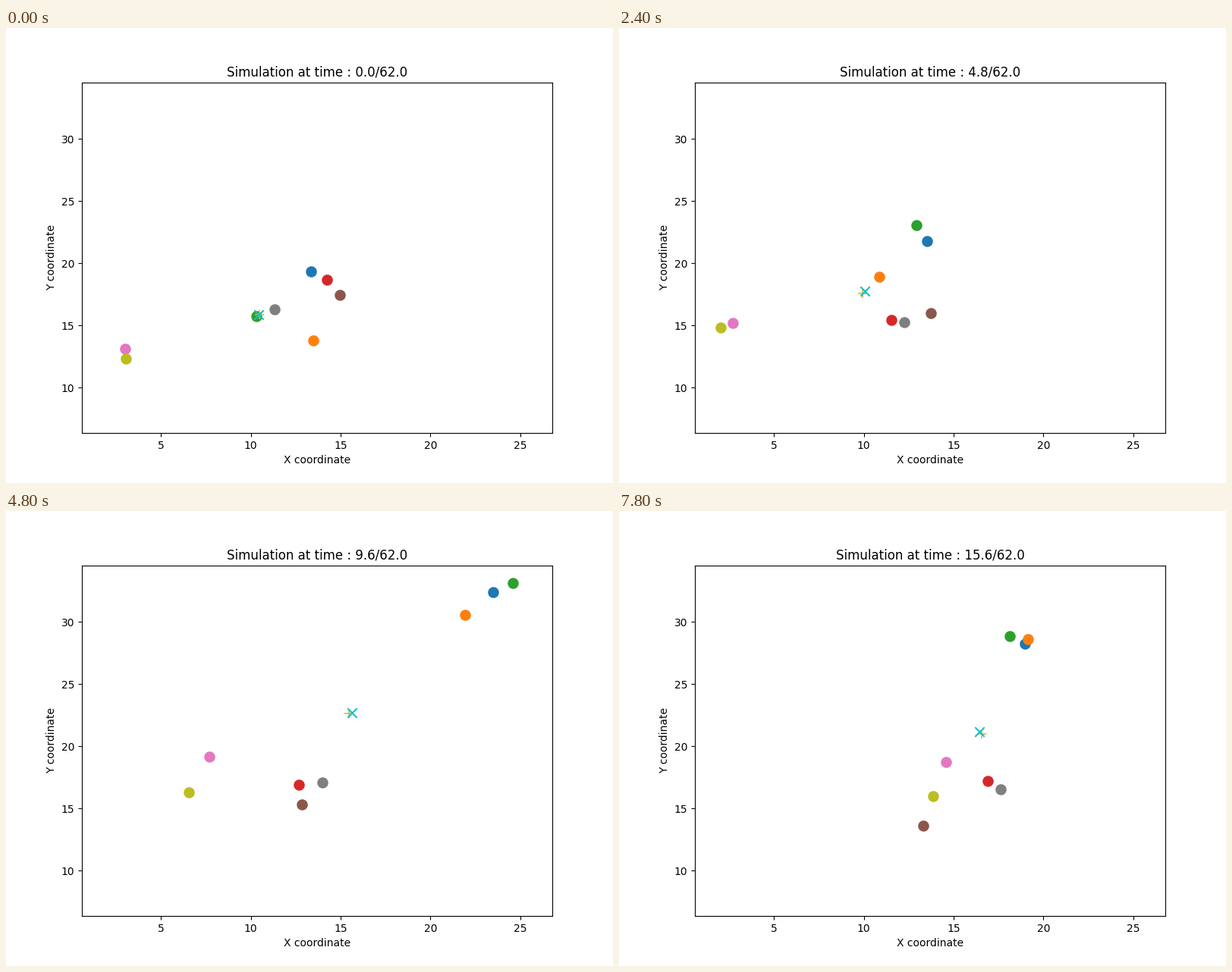
Animation, 800 px wide and 600 px high, one loop 8 s. Source, as a matplotlib script:

```python
import numpy as np
import matplotlib.pyplot as plt
from matplotlib.animation import FuncAnimation

FRAMES, INTERVAL, STEP, END = 40, 200, 0.4, 62.0
XLIM, YLIM = (0.6, 26.783), (6.37, 34.54)

# Each agent glides along a smooth curve through a few stage points (x + yj).
# Runners need points around their sprint; walkers use even spacing.
RUN_STEPS = [0, 8, 16, 20, 24, 32, 39]
WALK_STEPS = [0, 10, 20, 30, 39]
RUNNERS = {
    "C0": [402.5+321j, 392.5+340.5j, 469.5+198j, 583+131.5j,
           641.5+107j, 666+108j, 535.3+175j],
    "C1": [405+411.7j, 385.7+405.5j, 353+228j, 470.7+153.5j,
           604.7+136.7j, 659+112.3j, 539+169j],
    "C2": [329.7+380.3j, 384.7+338j, 458.2+175j, 607.2+120j,
           667.8+94.7j, 666.7+109j, 515+165.3j],
}
WALKERS = {
    "C3": [423.4+331.6j, 371+383j, 348+371j, 457+352.5j, 486.4+356.2j],
    "C5": [440+352.2j, 420+374j, 384+382.5j, 408+396j, 401.2+415.3j],
    "C6": [157.2+422.7j, 145+398j, 212+343j, 355+310j, 430.7+330.8j],
    "C7": [354.2+370.5j, 376+390j, 387+368j, 470+351.5j, 502.6+366.8j],
    "C8": [158+436.1j, 131+402j, 187+375j, 328+371j, 413.8+376.2j],
}


def spline(t, p):
    """Natural cubic spline through points p at steps t, for every frame."""
    t, p = np.array(t, float), np.array(p)
    n, h = len(t), np.diff(t)
    slope = np.diff(p) / h
    a, b = np.eye(n), np.zeros(n, complex)
    for i in range(1, n - 1):
        a[i, i - 1:i + 2] = h[i - 1], 2 * (h[i - 1] + h[i]), h[i]
        b[i] = 6 * (slope[i] - slope[i - 1])
    m = np.linalg.solve(a, b)
    s = np.arange(FRAMES)
    k = np.clip(np.searchsorted(t, s, side="right") - 1, 0, n - 2)
    u, v, d = s - t[k], t[k + 1] - s, h[k]
    return ((m[k] * v**3 + m[k + 1] * u**3) / (6 * d)
            + (p[k] / d - m[k] * d / 6) * v
            + (p[k + 1] / d - m[k + 1] * d / 6) * u)


def to_data(p):
    x = XLIM[0] + (p.real - 100) / 620 * np.ptp(XLIM)
    y = YLIM[0] + (534 - p.imag) / 462 * np.ptp(YLIM)
    return np.column_stack([x, y])


agents = {c: spline(RUN_STEPS, p) for c, p in RUNNERS.items()}
agents |= {c: spline(WALK_STEPS, p) for c, p in WALKERS.items()}
centre = np.mean(list(agents.values()), axis=0)

# The estimated centre is the true one plus a little measurement noise
rng = np.random.default_rng(4)
noise = rng.normal(0, 1.8, (FRAMES, 2)) @ [1, 1j]

fig, ax = plt.subplots(figsize=(8, 6), dpi=100)
ax.set(xlim=XLIM, ylim=YLIM, xlabel="X coordinate", ylabel="Y coordinate")
ax.set_xticks(range(5, 30, 5))
ax.set_yticks(range(10, 35, 5))
title = ax.set_title("")

movers = []


def add(path, color, marker="o", width=1.5):
    dot = ax.scatter([], [], s=80, color=color, marker=marker, linewidth=width)
    movers.append((dot, to_data(path)))


for color, path in agents.items():
    add(path, color)
add(centre, "#c8bc3c", "+", 1.2)
add(centre + noise, "C9", "x")


def draw(i):
    for dot, path in movers:
        dot.set_offsets(path[i])
    title.set_text(f"Simulation at time : {i * STEP:.1f}/{END}")
    return [dot for dot, _ in movers] + [title]


anim = FuncAnimation(fig, draw, frames=FRAMES, interval=INTERVAL,
                     init_func=lambda: draw(0), repeat=True, repeat_delay=0)
plt.show()
```
